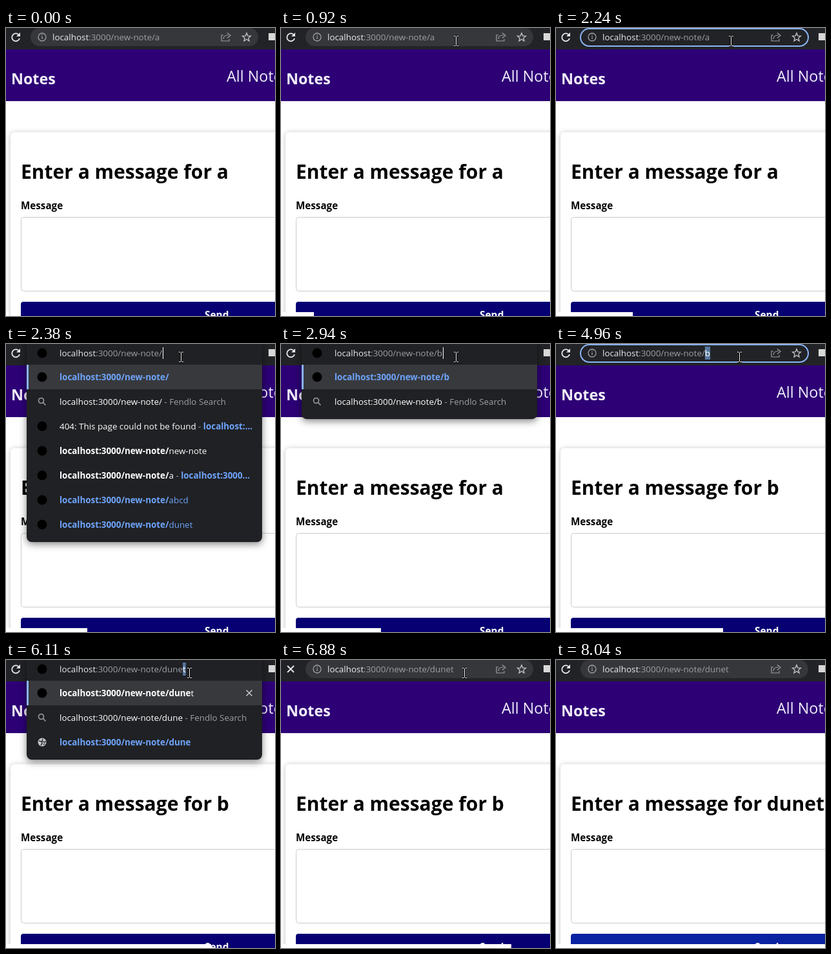
An HTML page with a canvas that plays this animation: 417 px wide and 445 px high, repeating every 8110 ms.

```html
<!DOCTYPE html>
<html lang="en">
<head>
<meta charset="utf-8">
<title>Notes</title>
<style>
html, body { margin: 0; width: 100%; height: 100%; overflow: hidden; background: #fff; }
canvas { display: block; }
</style>
</head>
<body>
<canvas id="stage" width="417" height="445"></canvas>
<script>
const W = 417, H = 445, LOOP = 8110;
const c = document.getElementById('stage').getContext('2d');
const HOST = 'localhost', PATH = ':3000/new-note/', BASE = HOST + PATH;
const NAME = 'dunet', ENGINE = ' - Fendlo Search';
const DARK = '#222326', PILL = '#36373a', PALE = '#e8eaed', GREY = '#9aa0a6', BLUE = '#6ea4fb', RING = '#8ab4f8';

// Each entry changes part of the state from its time on.
const STEPS = [
  [0, { tail: 'a', title: 'a', focus: false, sel: 0, list: '', busy: false }],
  [1120, { focus: true, sel: 99 }],
  [1600, { sel: 0 }],
  [2310, { tail: '', list: 'history' }],
  [2660, { tail: 'b', list: 'new' }],
  [3010, { focus: false, list: '', busy: true }],
  [3900, { title: 'b', busy: false }],
  [4440, { focus: true, sel: 99 }],
  [4700, { sel: 0 }],
  [4890, { sel: 1 }],
  [5160, { tail: '', sel: 0, list: 'history' }],
  [5440, { tail: NAME, sel: 4, list: 'known' }],
  [5640, { sel: 3 }],
  [5830, { sel: 2 }],
  [6030, { sel: 1 }],
  [6520, { focus: false, sel: 0, list: '', busy: true }],
  [7000, { title: NAME, busy: false }]
];

const POINTER = [
  [0, 440, 300], [350, 440, 300], [850, 271, 20], [4250, 271, 20], [4650, 284, 20],
  [7250, 284, 20], [7560, 300, 112], [7990, 345, 470], [LOOP, 345, 470]
];

function stateAt(t) {
  return Object.assign({}, ...STEPS.filter(s => s[0] <= t).map(s => s[1]));
}

function pointerAt(t) {
  const i = POINTER.findIndex(p => p[0] > t);
  const [t0, x0, y0] = POINTER[i - 1], [t1, x1, y1] = POINTER[i];
  const u = (t - t0) / (t1 - t0), k = u * u * (3 - 2 * u);
  return [x0 + (x1 - x0) * k, y0 + (y1 - y0) * k];
}

function rect(x, y, w, h, fill) {
  c.fillStyle = fill;
  c.fillRect(x, y, w, h);
}

function round(x, y, w, h, r, fill, stroke, width = 1) {
  c.beginPath();
  c.roundRect(x, y, w, h, r);
  if (fill) { c.fillStyle = fill; c.fill(); }
  if (stroke) { c.strokeStyle = stroke; c.lineWidth = width; c.stroke(); }
}

function disc(x, y, r, fill) {
  c.beginPath();
  c.arc(x, y, r, 0, 7);
  c.fillStyle = fill;
  c.fill();
}

function line(d, color, width = 1.3) {
  c.strokeStyle = color;
  c.lineWidth = width;
  c.stroke(new Path2D(d));
}

function setFont(size, bold) {
  c.font = `${bold ? 700 : 400} ${size}px "Open Sans", "Noto Sans", sans-serif`;
}

function text(s, x, y, size, color, bold) {
  setFont(size, bold);
  c.fillStyle = color;
  c.fillText(s, x, y);
  return x + c.measureText(s).width;
}

// Draws [text, colour, bold] parts one after another.
function run(parts, x, y) {
  for (const [s, color, bold] of parts) x = text(s, x, y, 13.4, color, bold);
}

function cross(x, y, r, color, width) {
  line(`M${x - r} ${y - r}l${2 * r} ${2 * r}m0 ${-2 * r}l${-2 * r} ${2 * r}`, color, width);
}

function page(s, hover) {
  rect(0, 0, W, H, '#fff');
  rect(0, 33, W, 80, '#2d0076');
  text('Notes', 8, 87, 23.3, '#f3eefa', true);
  text('All Notes', 342, 83, 23.4, '#f3eefa');

  c.save();
  c.shadowColor = 'rgba(0,0,0,.25)';
  c.shadowBlur = 8;
  c.shadowOffsetY = 1;
  round(7, 161, 500, 400, 6, '#fff');
  c.restore();

  text('Enter a message for ' + s.title, 23, 233, 30, '#000', true);
  text('Message', 23, 280, 15.2, '#000', true);
  round(23.5, 292.5, 500, 114, 4, '#fff', '#ccc');
  round(23, 423, 500, 60, 4, hover ? '#0a23a2' : '#060073');
  text('Send', 308, 449, 15.4, '#fff', true);
}

function url(s, x) {
  const full = BASE + s.tail, cut = Math.max(0, full.length - s.sel);
  setFont(13.4);
  const from = x + c.measureText(full.slice(0, cut)).width;
  const end = x + c.measureText(full).width;
  if (s.sel) rect(from, 4, end - from, 20, '#56779f');
  run([[HOST, PALE], [PATH + s.tail, GREY]], x, 19);
  if (s.sel) {
    c.save();
    c.beginPath();
    c.rect(from, 0, end - from, 30);
    c.clip();
    run([[full, '#fff']], x, 19);
    c.restore();
  } else if (s.list) rect(Math.round(end) + 1, 5, 1, 18, '#fff');
}

function toolbar(s) {
  rect(0, 0, W, 33, DARK);
  if (s.busy) cross(15, 14, 5, PALE, 1.8);
  else {
    line('M20.5 11.5A6 6 0 1 0 21 16', PALE, 1.8);
    c.fillStyle = PALE;
    c.fill(new Path2D('M22 7v6h-6z'));
  }
  rect(407, 8, 10, 11, '#d8d8d8');
  if (s.list) return;

  if (s.focus) round(38, 1, 353, 27, 13.5, DARK, RING, 2);
  else round(38, 0, 353, 28, 14, PILL);
  line('M62 14a6 6 0 1 0-12 0a6 6 0 1 0 12 0M56 13v4M56 10.3v1.4', GREY);
  url(s, 72);
  line('M337 11h-3v9h12v-3M337 17c0-5 4-6 8-6M343 7.5l5 4l-5 4', GREY, 1.2);
  let star = '';
  for (let i = 0; i < 10; i++) {
    const r = i % 2 ? 3 : 6.8, a = i * Math.PI / 5;
    star += `${i ? 'L' : 'M'}${373 + r * Math.sin(a)} ${14.5 - r * Math.cos(a)}`;
  }
  line(star + 'Z', '#c4c7cc');
}

const ICONS = {
  site: y => disc(56, y, 7.5, '#000'),
  search: y => line(`M58.5 ${y - 1.5}a4 4 0 1 0-8 0a4 4 0 1 0 8 0M57.5 ${y + 1.5}l4 4`, GREY, 1.6),
  globe: y => {
    disc(56, y, 6.5, '#c4c7cc');
    line(`M51 ${y - 2}l4 1l1 3l-2 3M57 ${y - 5}l-1 3l3 2l3-1M58 ${y + 4}l2-2`, DARK, 1.4);
  }
};

function rowsFor(s) {
  const typed = BASE + s.tail.slice(0, s.tail.length - s.sel);
  const search = ['search', [typed, '#fff'], [ENGINE, GREY]];
  if (s.list === 'new') return [['site', [typed, BLUE, true]], search];
  if (s.list === 'known') return [
    ['site', [typed, '#fff', true], [s.tail.slice(-s.sel), '#fff']],
    search,
    ['globe', [typed, BLUE, true]]
  ];
  return [
    ['site', [BASE, BLUE, true]],
    search,
    ['site', ['404: This page could not be found', '#fff'], [' - ', GREY], ['localhost:...', BLUE, true]],
    ['site', [BASE, '#fff', true], ['new-note', '#fff']],
    ['site', [BASE, '#fff', true], ['a', '#fff'], [' - ', GREY], ['localhost:3000...', BLUE, true]],
    ['site', [BASE, BLUE, true], ['abcd', BLUE]],
    ['site', [BASE, BLUE, true], [NAME, BLUE]]
  ];
}

function dropdown(s) {
  const rows = rowsFor(s);
  c.save();
  c.shadowColor = 'rgba(0,0,0,.5)';
  c.shadowBlur = 12;
  c.shadowOffsetY = 3;
  round(32, -10, 365, 50 + rows.length * 38, 8, '#202124');
  c.restore();
  rect(32, 32, 365, 38, '#38393d');
  rect(32, 32, 3, 38, RING);
  ICONS.site(14);
  url(s, 83);
  rows.forEach(([icon, ...parts], i) => {
    const y = 51 + i * 38;
    ICONS[icon](y);
    run(parts, 83, y + 5);
  });
  if (s.list === 'known') cross(377, 51, 4.5, '#c4c7cc', 1.5);
}

function pointer(x, y) {
  c.save();
  c.translate(Math.round(x), Math.round(y));
  if (y < 33 || (y > 292 && y < 407)) {
    const beam = 'M-3 -7.5h2.5l1 1l1 -1h2.5M.5 -6.5v13M-3 7.5h2.5l1 -1l1 1h2.5';
    line(beam, '#000', 2.6);
    line(beam, '#fff', 1);
  } else {
    const arrow = new Path2D('M0 -8v16l4-4l3 6l2-1l-3-6h5z');
    c.fillStyle = '#fff';
    c.fill(arrow);
    c.strokeStyle = '#000';
    c.lineWidth = 1;
    c.stroke(arrow);
  }
  c.restore();
}

function draw(now) {
  const t = now % LOOP, s = stateAt(t), [x, y] = pointerAt(t);
  page(s, y > 423);
  toolbar(s);
  if (s.list) dropdown(s);
  pointer(x, y);
  rect(0, 439, Math.min(W, Math.round((t + 70) / LOOP * W)), 6, '#fff');
}

const start = performance.now();
function tick() {
  draw(performance.now() - start);
  requestAnimationFrame(tick);
}
tick();
</script>
</body>
</html>
```
